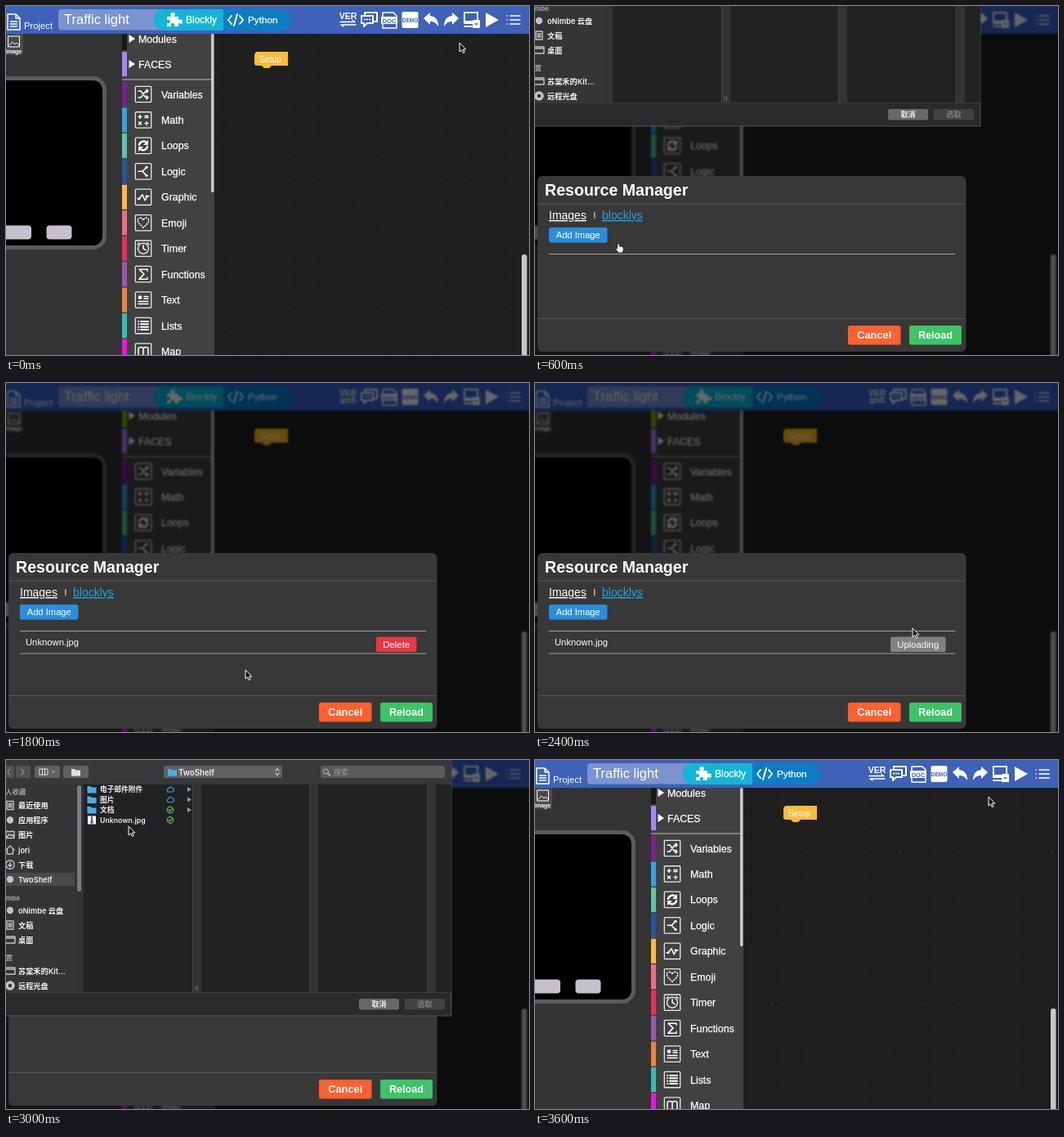
These frames come from a looping animation (640x427 px, 3800 ms). An HTML page:

```html
<!DOCTYPE html>
<html lang="en">
<head>
<meta charset="utf-8">
<title>Adding an image resource</title>
<style>
  html, body { margin: 0; width: 100%; height: 100%; overflow: hidden; background: #000; }
  svg { display: block; width: 640px; height: 427px; }
  text { font-family: "Liberation Sans", Arial, sans-serif; white-space: pre; }
  #finder text { font-family: Inter, "Noto Sans CJK SC", "Noto Sans CJK", sans-serif; }
  .dim { filter: blur(1.3px) saturate(1.25) brightness(.4); }
  .line { fill: none; stroke: #fff; stroke-width: 1.5; stroke-linecap: round; stroke-linejoin: round; }
</style>
</head>
<body>
<svg id="stage" viewBox="0 0 640 427"></svg>
<script>
const rect = (x, y, w, h, fill, rx = 0, more = "") =>
  `<rect x="${x}" y="${y}" width="${w}" height="${h}" fill="${fill}" rx="${rx}" ${more}/>`;
const text = (x, y, str, size, fill = "#fff", more = "") =>
  `<text x="${x}" y="${y}" font-size="${size}" fill="${fill}" ${more}>${str}</text>`;
const line = (d, more = "") => `<path class="line" d="${d}" ${more}/>`;
const fill = (d, color = "#fff", more = "") => `<path d="${d}" fill="${color}" ${more}/>`;
const circle = (x, y, r, color, more = "") => `<circle cx="${x}" cy="${y}" r="${r}" fill="${color}" ${more}/>`;
const group = (id, body, more = "") => `<g id="${id}" ${more}>${body}</g>`;
const at = (x, y, body) => `<g transform="translate(${x} ${y})">${body}</g>`;
const BOLD = 'font-weight="700"', SEMI = 'font-weight="600"';
const MID = ' text-anchor="middle" ', END = ' text-anchor="end" ';
const SOLID = 'stroke="#fff" stroke-width=".25"';

// ---- Editor behind everything ----
const categories = [
  ["Variables", "#7b1f8f", line("M-6-4h3l6 8h3M-6 4h3l6-8h3M4-6l2 2-2 2M4 2l2 2-2 2")],
  ["Math", "#38a3dd", line("M-6-4h4M-4-6v4M2-5h4M2-3h4M-5.5 2.5l3 3M-2.5 2.5l-3 3M2 4h4M4 2v.2M4 6v.2")],
  ["Loops", "#5cc5a8", line("M-5-1a5.5 5.5 0 0 1 9-3M5 1a5.5 5.5 0 0 1-9 3", 'style="stroke-width:2.5"') +
    fill("M6-7v6h-6zM-6 7v-6h6z")],
  ["Logic", "#2a52a0", line("M-6 0h5l5-5M-1 0l5 5") + circle(4, -5, 1.7, "#fff") + circle(4, 5, 1.7, "#fff")],
  ["Graphic", "#fdbb40", line("M-7 2h2l4-5 3 7 3-5h2") + circle(-5, 2, 1.5, "#fff") + circle(4, -1, 1.5, "#fff")],
  ["Emoji", "#f06d82", line("M0 6l-6-6q-2-5 2-6 3 0 4 3 1-3 4-3 4 1 2 6z", 'stroke-dasharray="1 2.2"')],
  ["Timer", "#ec2b5e", circle(0, 0, 6.5, "none", 'stroke="#fff" stroke-width="1.3"') + line("M0-4v4l3 2M-5-7l-2 2M5-7l2 2")],
  ["Functions", "#9a56ad", line("M5-4v-2h-10l6 6-6 6h10v-2")],
  ["Text", "#ee823c", circle(-4, -3, 2.4, "#fff") + line("M1-4h5M1-1.5h5M-6 2h12M-6 5h12")],
  ["Lists", "#35bfb0", line("M-6-5h.2M-3-5h9M-6-1.7h.2M-3-1.7h9M-6 1.7h.2M-3 1.7h9M-6 5h.2M-3 5h9", 'style="stroke-width:2"')],
  ["Map", "#f012e0", line("M-6-4q3-2 6 0 3-2 6 0v10q-3-2-6 0-3-2-6 0zM0-4v10")],
];

const categoryRow = ([name, color, icon], i) => {
  const y = 108 + i * 31.45;
  return rect(142, y - 15, 6, 30, color) +
    at(168, y, rect(-9.7, -9.7, 19.4, 19.4, "none", 1, 'stroke="#e8e8e8" stroke-width="1.3"') + icon) +
    text(190, y + 4.5, name, 12.4, "#fff", SOLID);
};

const toolbar =
  rect(-5, -5, 650, 39, "#3d62b8") +
  line("M2 10h10l5 5v14h-15zM12 10v5h5M5.5 19h8M5.5 22h8M5.5 25h8") +
  text(22, 28, "Project", 11.3) +
  rect(64, 4, 140, 25.5, "#7b93ce", 4) +
  text(71, 22, "Traffic light", 16.5) +
  rect(220, 4, 129, 26, "#0c7ec4", 13) +
  fill("M194 4h72v26h-72a13 13 0 0 1 0-26z", "#13b5d6") +
  fill("M197 13h5q-2-5 2-5t2 5h5v4q5-2 5 2t-5 2v4h-5q1-4-2-4t-2 4h-5v-4q4 1 4-2t-4-2z") +
  text(220, 21, "Blockly", 12, "#fff", SOLID) +
  line("M276 12l-4 5 4 5M286 12l4 5-4 5M283 10l-4 14", 'style="stroke-width:2"') +
  text(296, 21, "Python", 11.7, "#fff", SOLID) +
  text(418.5, 16, "VER", 10.5, "#fff", BOLD + MID) +
  line("M409 19.5h18l-3-2M428 23h-18l3 2") +
  line("M439 11v-3h15v11h-3M435 12h14v9h-7l-4 4v-4h-3zM439 16.5h.2M442 16.5h.2M445 16.5h.2", 'style="stroke-width:2"') +
  line("M461 27v-19h13l4 4v15z") + rect(459, 13, 20, 9, "#fff", 1) +
  text(469, 20.5, "DOC", 7.5, "#3d62b8", BOLD + MID) +
  rect(484.5, 7, 20, 20, "#fff", 2) + text(494.5, 19.5, "DEMO", 6.5, "#3d62b8", BOLD + MID) +
  fill("M511 15l8-7v4q10 1 10 13-4-7-10-6v4z") +
  fill("M554 15l-8-7v4q-10 1-10 13 4-7 10-6v4z") +
  line("M561 8h16v13h-16zM561 25h9", 'style="stroke-width:2"') + rect(561, 18, 17, 4, "#fff") +
  rect(571, 17, 9, 10, "#fff", 1) + line("M574 22h3", 'style="stroke:#3d62b8"') +
  fill("M587 8l16 9-16 9z") +
  line("M613 12h.2M617 12h12M613 17h.2M617 17h12M613 22h.2M617 22h12");

const editor =
  rect(-5, 30, 650, 402, "#1f1f1f") + rect(255, 34, 390, 398, "url(#dots)") +
  rect(-5, 34, 148, 398, "#333") +
  rect(0, 34, 21, 26, "#4a4a4a") + line("M3 37h13.5v13h-13.5zM4 48l4-4 3 3 2-2 3 3", 'style="stroke-width:1"') +
  text(-1, 58, "Image", 7, "#fff", BOLD) +
  rect(-40, 88.5, 160.5, 207, "#000", 14, 'stroke="#5b5b5b" stroke-width="5"') +
  rect(-3, 268.5, 34, 17, "#c6c0cc", 4) + rect(49.5, 268.5, 31, 17, "#c6c0cc", 4) +
  rect(142, 34, 113, 398, "#414141") +
  rect(142, 34, 6, 20, "#161a12") + group("moduleBar", rect(142, 34, 6, 20, "#6fb512")) +
  rect(142, 56, 6, 30, "#a784f5") +
  fill("M150.5 35l7.5 5-7.5 5zM150.5 66l7.5 5-7.5 5z") +
  text(162, 44.5, "Modules", 12.4, "#fff", SOLID) + text(162, 75.5, "FACES", 12.4, "#fff", SOLID) +
  rect(142, 89.5, 109, 1, "#bbb") + categories.map(categoryRow).join("") +
  rect(251, 34, 3.5, 194, "#c9c9c9", 1.5) +
  fill("M308 56h37v17h-20l-3 3h-6l-3-3h-6q-3 0-3-3v-9q0-5 4-5z", "#fcbc38") +
  text(310, 68.5, "Setup", 10.4) +
  rect(631, 304, 6.5, 130, "#c8c8c8", 3) + toolbar;

// ---- Resource manager dialog ----
const button = (x, y, w, h, color, label, size, more = "") =>
  rect(x, y, w, h, color, 2.5) + text(x + w / 2, y + h / 2 + size * .36, label, size, "#fff", MID + more);

const modal =
  rect(3, 208, 524.5, 215, "#383838", 6) +
  text(12, 231.5, "Resource Manager", 19.6, "#fff", BOLD) +
  rect(3, 241.5, 524, 1, "#545454") + rect(3, 382, 524, 1, "#545454") +
  text(17, 261, "Images", 14, "#fff", 'text-decoration="underline"') + text(71.5, 260, "I", 10) +
  text(82, 261, "blocklys", 14, "#21a6df", 'text-decoration="underline"') +
  button(17, 271, 71.5, 18.5, "#2a8edb", "Add Image", 11.2) +
  rect(17, 303, 497, 1, "#a0a0a0") +
  group("fileRow", text(24, 321, "Unknown.jpg", 11.25) + rect(17, 330.5, 497, 1, "#a0a0a0") +
    group("uploading", button(435, 310.5, 67.5, 18.5, "#828282", "Uploading", 11.3)) +
    group("delete", button(453, 310.5, 49.5, 18.5, "#e53845", "Delete", 11.4))) +
  button(383, 391, 64.5, 23.5, "#ff6030", "Cancel", 12.8, BOLD) +
  button(458, 391, 64, 23.5, "#3cc466", "Reload", 12.6, BOLD);

// ---- File chooser ----
const GREY = 'style="stroke:#c4c4c4;stroke-width:1.4"';
const sideIcons = {
  page: line("M-4-5h8v10h-8zM-2-2h4M-2 0h4M-2 2h4", GREY),
  photo: line("M-5-4h10v8h-10zM-4 3l3-4 2 2 2-1 2 3", GREY),
  home: line("M-5 0l5-5 5 5M-3.5-1v6h7v-6", GREY),
  down: circle(0, 0, 5.2, "none", 'stroke="#c4c4c4" stroke-width="1.4"') + line("M0-3v5M-2 0l2 2.5 2-2.5", GREY),
  screen: line("M-6-4h12v8h-12zM-6-2h12", GREY),
  disc: circle(0, 0, 4, "none", 'stroke="#c4c4c4" stroke-width="3.4"'),
  dot: circle(0, 0, 4.2, "#c4c4c4"),
};
const places = [
  [55.5, "最近使用", "page"], [73.5, "应用程序", "dot"], [91.5, "图片", "photo"], [110, "jori", "home"],
  [128, "下载", "down"], [146, "TwoShelf", "dot"], [184, "oNimbe 云盘", "dot"], [202, "文稿", "page"],
  [220, "桌面", "screen"], [258, "苏棠禾的Kit...", "screen"], [276, "远程光盘", "disc"],
];
const sidebar =
  rect(0, 30, 84, 254, "#343536") + rect(0, 138, 84, 16, "#484949") +
  text(-9, 42, "个人收藏", 8.3, "#a5a5a5", BOLD) + text(17, 171.5, "oNimbe", 8, "#a5a5a5", BOLD + END) +
  text(8, 244.5, "位置", 8.3, "#a5a5a5", BOLD + END) +
  places.map(([y, name, icon]) => at(5, y, sideIcons[icon]) + text(15, y + 3.5, name, 9.2, "#f4f4f4", SEMI)).join("");

const folder = (x, y, color) => fill(`M${x} ${y - 4}h4l1.5 1.5h5.5v7h-11z`, color);
const cloud = y => line(`M198 ${y + 3}q-2-3 1-4 1-4 4-1 3 0 2.5 3-.5 2-2 2z`, 'style="stroke:#35a3e0;stroke-width:1.1"');
const check = (y, color) => circle(201, y, 3.8, "none", `stroke="${color}" stroke-width="1.2"`) +
  line(`M199 ${y}l1.5 1.5 2.5-3`, `style="stroke:${color};stroke-width:1.2"`);
const entry = (y, name) => text(115, y + 3.3, name, 8.7, "#eee", SEMI);
const track = x => rect(x, 30, 11, 254, "#313335") + rect(x, 30, .7, 254, "#4b4c4e");
const handle = x => line(`M${x} 277v5M${x + 2.5} 277v5`, 'style="stroke:#777;stroke-width:.8"');

const thermometer =
  rect(320.5, 43, 132, 132, "#fff") +
  fill("M373 59.5a14 14 0 0 1 28 0v62a27.5 27.5 0 1 1-28 0z", "#4b45a3") +
  fill("M379.5 70v-10.500a7.5 7.5 0 0 1 15 0v10.5z") +
  line("M379 60.5h8M379 66.500h8", 'style="stroke:#4b45a3;stroke-width:2.6"') +
  rect(379.5, 76, 15, 4.5, "#e9478c") + rect(379.5, 86, 15, 4.5, "#f8b27a") +
  fill("M379.5 95.500h15v30a21.5 21.5 0 1 1-15 0z", "#5ccaf8") +
  line("M380 134.500a13 13 0 1 0 20 11", 'style="stroke:#4b45a3;stroke-width:5"');

const facts = [["标签", "添加标签..."], ["创建时间", "今天 11:43"], ["修改时间", "今天 11:43"], ["上次打开时间", "今天 11:43"]];
const preview =
  rect(239, 30, 306, 254, "#202224") + rect(537, 31, 6, 210, "#737476", 3) + thermometer +
  text(387, 205, "Unknown.jpg", 11.2, "#ddd", MID) +
  text(387, 218, "JPEG 图像 – 13 KB", 8.4, "#aaa", MID + SEMI) +
  facts.map(([label, value], i) => text(369, 244.5 + i * 12.1, label, 8.6, "#b0b0b0", END + SEMI) +
    text(375, 244.5 + i * 12.1, value, 8.6, i ? "#eee" : "#666", i ? SEMI : "")).join("") + handle(536);

const smallButton = (x, color, label, ink) =>
  rect(x, 292, 49, 13.5, color, 2.5) + text(x + 24.5, 302, label, 9, ink, MID + SEMI);

const finder =
  rect(-5, -5, 550, 318, "#292a2c", 0, 'stroke="#555" stroke-width="1"') + rect(0, 0, 545, 30, "#37383a") +
  rect(-3, 7, 13, 15, "#505153", 2.5) + rect(12, 7, 18, 15, "#505153", 2.5) +
  line("M5 11l-3 3.5 3 3.5M19 11l3 3.5-3 3.5", 'style="stroke:#858585"') +
  rect(35, 7, 31, 15, "#606163", 2.5) + line("M41 11h10v7h-10zM44.5 11v7M47.5 11v7M56 13.5l2 2 2-2", 'style="stroke:#ddd;stroke-width:1"') +
  rect(70, 7, 31, 15, "#606163", 2.5) + folder(80, 15, "#e2e2e2") +
  rect(193, 7, 145, 15, "#606163", 3) + folder(198, 15, "#45b0ea") + text(211, 18.5, "TwoShelf", 9.7, "#f0f0f0", SEMI) +
  line("M330 13l2-2.5 2 2.5M330 16l2 2.5 2-2.5", 'style="stroke:#ddd;stroke-width:1.1"') +
  rect(385, 7, 152, 15, "#5a5b5d", 3) + circle(391.5, 14, 3, "none", 'stroke="#bbb"') + line("M394 16.5l2.5 2.5", GREY) +
  text(401, 18, "搜索", 9, "#999") +
  sidebar + rect(84, 30, 461, 254, "#202224") + rect(84, 30, 11, 254, "#313335") + rect(87, 31, 5, 130, "#7b7c7e", 2.5) +
  [228, 371, 515].map(track).join("") + handle(232) +
  group("preview", preview + rect(95, 67.5, 133, 12.5, "#31931d")) +
  [[36, "电子邮件附件"], [48.5, "图片"], [61, "文档"]].map(([y, name], i) =>
    folder(99.5, y, "#45b0ea") + entry(y, name) + (i < 2 ? cloud(y) : check(y, "#58c84a")) +
    fill(`M222 ${y - 3}l5 3-5 3z`, "#999")).join("") +
  rect(100, 68.5, 10, 10, "#fff") + circle(105, 76, 1.9, "#5059b8") + rect(104, 69, 2, 7, "#5059b8") + entry(73.5, "Unknown.jpg") +
  group("plainCheck", check(73.5, "#58c84a")) + group("darkCheck", check(73.5, "#12260d")) +
  rect(0, 284, 545, 1, "#3c3d3f") + smallButton(432, "#67686a", "取消", "#eee") +
  group("chooseOff", smallButton(488, "#414244", "选取", "#808080")) +
  group("chooseOn", smallButton(488, "#31ac23", "选取", "#fff"));

const arrow = fill("M0 0v11l2.6-2.3 1.7 3.8 1.8-.8-1.7-3.7h3.4z", "#111", 'stroke="#fff" stroke-width="1"');
const hand = fill("M-2-5q1.5-1.5 2 .5l.6 2.5q4 0 4.6 2v3l-1.5 3h-4.5l-3.5-4.5q0-2 2-.5z", "#fff", 'stroke="#111" stroke-width=".8"');

const stage = document.getElementById("stage");
stage.innerHTML =
  `<defs><pattern id="dots" width="14.3" height="14.3" patternUnits="userSpaceOnUse">
    <rect x="3" y="12" width="1" height="1" fill="#383838"/></pattern></defs>` +
  group("editor", editor) + group("modal", modal) + group("finder", finder) +
  group("cursor", group("arrow", arrow) + group("hand", hand));

// ---- Playback: ten poses, run forward and then back ----
const poses = [
  { x: 555, y: 45 },
  { x: 555, y: 45 },
  { x: 62, y: 285, modal: true, hand: true },
  { x: 103, y: 296, modal: true, hand: true, slide: -166 },
  { x: 150, y: 81, modal: true, slide: 0 },
  { x: 333, y: 191, modal: true, slide: 0, selected: true },
  { x: 515, y: 301, modal: true, slide: 0, selected: true },
  { x: 462, y: 300, modal: true, file: "uploading" },
  { x: 378, y: 326, modal: true, file: "delete" },
  { x: 293, y: 351, modal: true, file: "delete" },
];
const STEP = 200, LOOP = 3800;
const el = id => document.getElementById(id);
const show = (id, on) => { el(id).style.display = on ? "" : "none"; };
const move = (id, x, y) => el(id).setAttribute("transform", `translate(${x} ${y})`);

function draw(ms) {
  const step = Math.floor(ms % LOOP / STEP);
  const pose = poses[Math.min(step, 19 - step)];
  el("editor").setAttribute("class", pose.modal ? "dim" : "");
  show("moduleBar", pose.modal);
  show("modal", pose.modal);
  show("fileRow", pose.file);
  show("uploading", pose.file === "uploading");
  show("delete", pose.file === "delete");
  show("finder", pose.slide !== undefined);
  move("finder", 0, pose.slide || 0);
  for (const id of ["preview", "darkCheck", "chooseOn"]) show(id, pose.selected);
  for (const id of ["plainCheck", "chooseOff"]) show(id, !pose.selected);
  show("hand", pose.hand);
  show("arrow", !pose.hand);
  move("cursor", pose.x, pose.y);
}

const start = performance.now();
function tick() {
  draw(performance.now() - start);
  requestAnimationFrame(tick);
}
tick();
</script>
</body>
</html>
```
